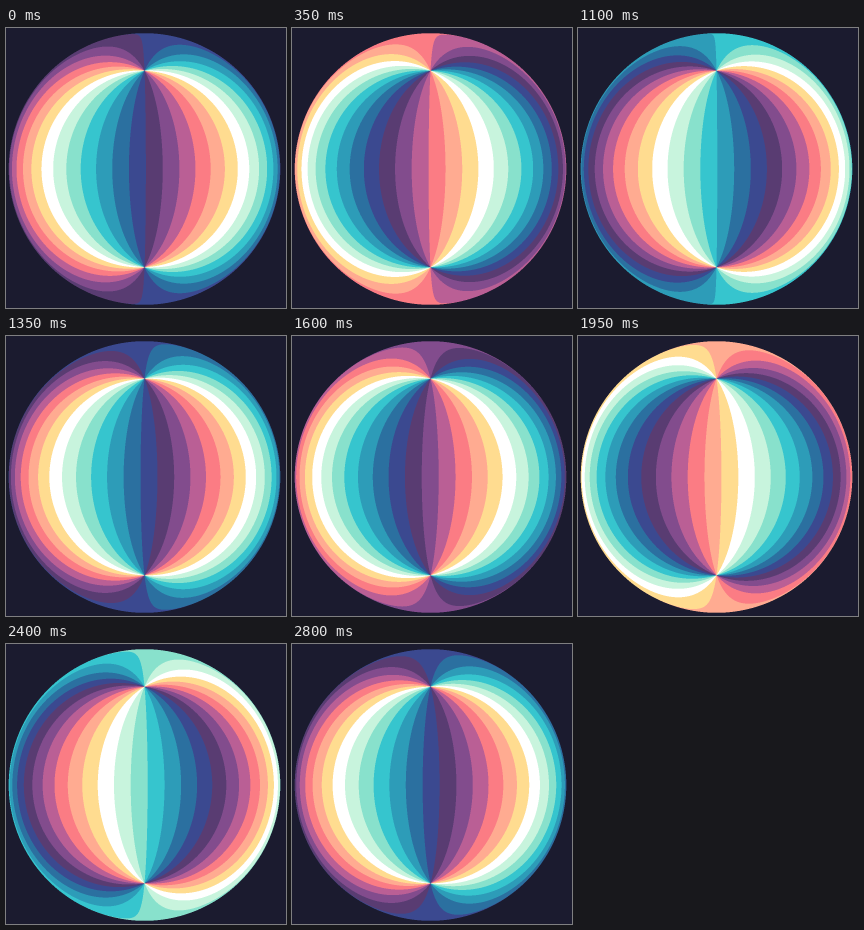
An HTML page with a canvas for the animation above (2.85 s loop, 280 by 280 pixels).

```html
<!DOCTYPE html>
<html lang="en">
<head>
<meta charset="utf-8">
<title>Turning striped sphere</title>
<style>
  html, body { margin: 0; width: 100%; height: 100%; overflow: hidden; background: #1b1b2f; }
  canvas { display: block; }
</style>
</head>
<body>
<canvas width="280" height="280"></canvas>
<script>
const SIZE = 280, SAMPLES = 3, SUB = SAMPLES * SAMPLES;
const FRAME_MS = 50, FRAMES = 57;
const CENTER_X = 138.5, CENTER_Y = 141, RADIUS = 135.8;
const CAMERA = 30; // distance from the centre of the unit sphere
const FOCAL = RADIUS * Math.sqrt(CAMERA ** 2 - 1);
const PHASE = -0.08;

const toRgb = hex => [1, 3, 5].map(i => parseInt(hex.slice(i, i + 2), 16));
const palette = [
  '#593c72', '#824c8d', '#ba5f95', '#fb7c84', '#ffab91', '#ffdc90', '#ffffff',
  '#c8f4dd', '#88e1cc', '#36c5ce', '#2d9cb8', '#2b70a0', '#3b4990'
].map(toRgb);
const background = toRgb('#1b1b2f');
const BANDS = palette.length;

// Band coordinate where the view ray through a pixel meets the sphere.
function bandAt(px, py) {
  const u = (px - CENTER_X) / FOCAL, v = (py - CENTER_Y) / FOCAL;
  const rayLength = 1 + u * u + v * v;
  const root = CAMERA ** 2 - (CAMERA ** 2 - 1) * rayLength;
  if (root < 0) return NaN;
  const t = (CAMERA - Math.sqrt(root)) / rayLength;
  const x = u * t, y = v * t, z = CAMERA - t;
  // Sum of the angles seen around the two poles, 45 degrees above and below the middle.
  const angle = Math.atan2(x, z - y) + Math.atan2(x, z + y);
  return (angle / Math.PI + 1) * BANDS;
}

const bands = new Float32Array(SIZE * SIZE * SUB);
for (let i = 0; i < bands.length; i++) {
  const pixel = Math.floor(i / SUB), sample = i % SUB;
  bands[i] = bandAt(
    pixel % SIZE + (sample % SAMPLES + 0.5) / SAMPLES,
    Math.floor(pixel / SIZE) + (Math.floor(sample / SAMPLES) + 0.5) / SAMPLES
  );
}

const ctx = document.querySelector('canvas').getContext('2d');
const image = ctx.createImageData(SIZE, SIZE);

function draw(frame) {
  // One loop carries the palette past the front twice.
  const shift = frame / FRAMES * 2 * BANDS + PHASE + BANDS;
  for (let pixel = 0; pixel < SIZE * SIZE; pixel++) {
    let r = 0, g = 0, b = 0;
    for (let s = 0; s < SUB; s++) {
      const band = bands[pixel * SUB + s];
      const color = Number.isNaN(band) ? background : palette[Math.floor(band + shift) % BANDS];
      r += color[0];
      g += color[1];
      b += color[2];
    }
    const o = pixel * 4;
    image.data[o] = r / SUB;
    image.data[o + 1] = g / SUB;
    image.data[o + 2] = b / SUB;
    image.data[o + 3] = 255;
  }
  ctx.putImageData(image, 0, 0);
}

let shown = -1;
function tick() {
  const frame = Math.floor(performance.now() / FRAME_MS) % FRAMES;
  if (frame !== shown) draw(shown = frame);
  requestAnimationFrame(tick);
}
tick();
</script>
</body>
</html>
```
